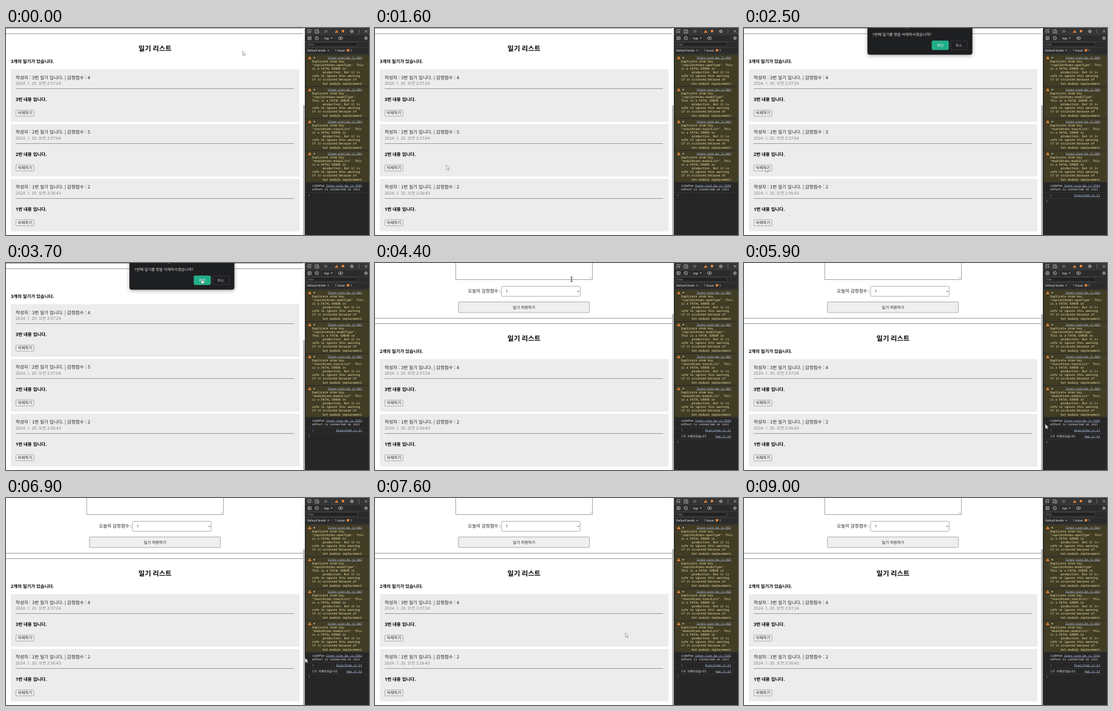
Animation of 600 by 343 pixels, one loop 9100 ms. Source, as an HTML page with a canvas:

```html
<!DOCTYPE html>
<html lang="ko">
<head>
<meta charset="utf-8">
<title>일기 리스트</title>
<style>
  html, body { margin: 0; width: 100%; height: 100%; overflow: hidden; background: #fff; }
  canvas { display: block; width: 600px; height: 343px; }
</style>
</head>
<body>
<canvas id="stage"></canvas>
<script>
const W = 600, H = 343, LOOP = 9100, STEP = 100;
const OPEN = 2300, REMOVE = 4200, LEAVE = 8500;
const SHIFT = 91;
const SANS = '"Noto Sans", "Noto Sans CJK KR", "Noto Sans CJK", sans-serif';
const CJK = '"Noto Sans CJK KR", "Noto Sans CJK", sans-serif';
const UI = 'Roboto, "Noto Sans CJK KR", sans-serif';
const MONO = '"Noto Sans Mono", "Noto Sans CJK KR", monospace';

const canvas = document.getElementById('stage');
const ctx = canvas.getContext('2d');
const dpr = window.devicePixelRatio || 1;
canvas.width = W * dpr;
canvas.height = H * dpr;

function rect(x, y, w, h, color) {
  ctx.fillStyle = color;
  ctx.fillRect(x, y, w, h);
}

function rule(x, y, w, color) {
  rect(x, Math.round(y), w, 1, color);
}

function box(x, y, w, h, r, fill, stroke, lw = 0.7) {
  ctx.beginPath();
  ctx.roundRect(x, y, w, h, r);
  if (fill) { ctx.fillStyle = fill; ctx.fill(); }
  if (stroke) { ctx.strokeStyle = stroke; ctx.lineWidth = lw; ctx.stroke(); }
}

function path(points, color, lw = 0.8) {
  ctx.beginPath();
  points.forEach(([x, y], i) => i ? ctx.lineTo(x, y) : ctx.moveTo(x, y));
  ctx.strokeStyle = color;
  ctx.lineWidth = lw;
  ctx.stroke();
}

function shape(points, color) {
  ctx.beginPath();
  points.forEach(([x, y]) => ctx.lineTo(x, y));
  ctx.fillStyle = color;
  ctx.fill();
}

function ring(x, y, r, color, lw = 0.8) {
  ctx.beginPath();
  ctx.arc(x, y, r, 0, Math.PI * 2);
  ctx.strokeStyle = color;
  ctx.lineWidth = lw;
  ctx.stroke();
}

// y is the visual middle of the line
function text(s, x, y, size, color, { family = SANS, weight = 400, align = 'left' } = {}) {
  ctx.font = `${weight} ${size}px ${family}`;
  ctx.textAlign = align;
  ctx.fillStyle = color;
  ctx.fillText(s, x, y + size * 0.36);
  return ctx.measureText(s).width;
}

const bold = { weight: 700 };
const center = { align: 'center' };

/* ---------- page ---------- */

const LINE = '#9a9a9a', BORDER = '#8c8c8c', INK = '#1c1c1c';

const entries = [
  { id: 3, score: 4, time: '2:37:24' },
  { id: 2, score: 5, time: '2:37:04' },
  { id: 1, score: 2, time: '2:36:43' }
];

function card(e, y, hover) {
  rect(8, y, 477, 87, '#ececec');
  text(`작성자 : ${e.id}번 일기 입니다. | 감정점수 : ${e.score}`, 16, y + 13.5, 7.5, INK, { family: CJK });
  text(`2024. 1. 20. 오전 ${e.time}`, 16, y + 23.4, 6.75, '#808080');
  rule(16, y + 31.6, 460, LINE);
  text(`${e.id}번 내용 입니다.`, 16, y + 50.4, 7.45, '#000', bold);
  box(16.4, y + 67.9, 29.8, 9.9, 1, hover ? '#e2e2e2' : '#efefef', BORDER);
  text('삭제하기', 31.2, y + 72.8, 6.5, INK, center);
}

function form() {
  path([[133.4, 0], [133.4, 27.5], [359.4, 27.5], [359.4, 0]], BORDER);
  path([[354.5, 26], [358, 22.5]], '#888', 0.5);
  path([[356.5, 26], [358, 24.5]], '#888', 0.5);
  text('오늘의 감정점수 :', 153.5, 46.5, 7.5, INK);
  box(209.2, 38.6, 130, 16.6, 1.5, '#fff', BORDER);
  text('1', 216, 46.8, 6.4, INK);
  path([[334.6, 46.1], [336.2, 47.8], [337.8, 46.1]], '#222', 0.8);
  box(137.9, 64.6, 216.5, 17.4, 1, '#efefef', BORDER);
  text('일기 저장하기', 246.3, 73.2, 6.4, INK, center);
}

function page(removed, hover) {
  const top = removed ? 0 : -SHIFT;
  const list = removed ? entries.filter(e => e.id !== 2) : entries;
  rect(0, 0, 494, H, '#fff');
  if (removed) form();
  rule(0, top + 91, 491, LINE);
  rule(0, top + 100, 491, LINE);
  text('일기 리스트', 246.3, top + 125, 11.2, '#000', { ...bold, ...center });
  text(`${list.length}개의 일기가 있습니다.`, 8, top + 145.9, 7.4, '#000', bold);
  list.forEach((e, i) => card(e, top + 159.3 + i * 90.8, hover && e.id === 2));
  rect(491, 0, 3, H, '#f4f4f4');
  const thumb = removed ? 85 : 128;
  rect(491, thumb, 3, H - thumb, '#b8b8b8');
}

function dialog() {
  ctx.save();
  ctx.shadowColor = 'rgba(0,0,0,.35)';
  ctx.shadowBlur = 6 * dpr;
  ctx.shadowOffsetY = 1.5 * dpr;
  box(204, -10, 173.5, 54.3, 4, '#1e1f21');
  ctx.restore();
  text('내용:', 261, -2.2, 6.3, '#ddd');
  text('1번째 일기를 정말 삭제하시겠습니까?', 212, 10.6, 6.25, '#e4e4e4');
  box(310.8, 21.3, 27.2, 14.6, 1.8, '#1fae88', '#38c49d', 0.8);
  text('확인', 324.4, 28.6, 6, '#fff', center);
  box(341.4, 21.6, 27.4, 14.2, 1.8, '#1e1f21', '#45474a', 0.7);
  text('취소', 355, 28.6, 6, '#c4c4c4', center);
}

/* ---------- console ---------- */

const ICON = '#c7c7c7', ORANGE = '#f08a3c', RULE = '#454545';
const LINK = '#b4c6ea', LOG = '#ececec';

function warnSign(x, y, s = 2.7) {
  shape([[x, y - s], [x + s * 1.1, y + s * 0.8], [x - s * 1.1, y + s * 0.8]], ORANGE);
  rect(x - 0.3, y - s * 0.35, 0.6, 1.4, '#3a2410');
}

function caret(x, y) {
  shape([[x, y - 1], [x + 2.8, y - 1], [x + 1.4, y + 1.2]], ICON);
}

function gear(x, y) {
  ring(x, y, 2.1, ICON, 0.9);
  ring(x, y, 0.6, ICON, 0.7);
  for (let a = 0; a < 6; a++) {
    const c = Math.cos(a * Math.PI / 3), s = Math.sin(a * Math.PI / 3);
    path([[x + 2.2 * c, y + 2.2 * s], [x + 3 * c, y + 3 * s]], ICON, 0.9);
  }
}

function issueMark(x, y) {
  box(x - 2, y - 2, 4, 3.5, 0.5, ORANGE);
  shape([[x - 1.2, y + 1.2], [x + 0.8, y + 1.2], [x - 1.2, y + 2.8]], ORANGE);
}

function toolbar() {
  rect(494, 0, 106, 43.5, '#2b2b2b');
  rect(494, 0, 106, 11, '#353535');
  [11, 22.2, 32.2, 43.4].forEach(y => rect(494, y, 106, 0.6, RULE));

  path([[504.4, 4], [504.4, 2.8], [499, 2.8], [499, 8], [500.6, 8]], ICON);
  shape([[501.2, 4.8], [505, 6.4], [503.4, 7], [502.8, 8.8]], ICON);
  path([[511, 7.8], [511, 3], [516.5, 3]], ICON);
  path([[510.3, 8.2], [513.5, 8.2]], ICON);
  box(514.2, 4.4, 2.8, 4.2, 0.5, null, ICON, 0.8);
  [526.2, 528.8].forEach(x => path([[x, 3.4], [x + 2.1, 5.5], [x, 7.6]], '#a9c0ea', 0.8));
  rect(538.5, 2, 0.5, 7, RULE);
  warnSign(546.5, 5.7);
  issueMark(557, 5.3);
  rect(563.5, 2, 0.5, 7, RULE);
  gear(571.6, 5.5);
  [3, 5.5, 8].forEach(y => box(582.8, y - 0.6, 1.2, 1.2, 0.6, ICON));
  path([[593, 3.3], [597.2, 7.6]], ICON);
  path([[597.2, 3.3], [593, 7.6]], ICON);

  box(499, 14.3, 5.4, 5, 0.4, null, ICON, 0.8);
  path([[500.8, 14.3], [500.8, 19.3]], ICON);
  shape([[502, 15.6], [503.6, 16.8], [502, 18]], ICON);
  ring(513.8, 16.8, 2.8, ICON);
  path([[512, 15], [515.6, 18.6]], ICON);
  rect(521, 13, 0.5, 8, RULE);
  text('top', 526, 16.8, 5.6, '#e6e6e6', { family: UI });
  caret(537, 16.8);
  rect(543.8, 13, 0.5, 8, RULE);
  ctx.beginPath();
  ctx.ellipse(553, 16.8, 3.6, 2.3, 0, 0, Math.PI * 2);
  ctx.strokeStyle = ICON;
  ctx.stroke();
  box(551.9, 15.7, 2.2, 2.2, 1.1, ICON);
  rect(588, 13, 0.5, 8, RULE);
  gear(595, 16.8);

  box(496.3, 23.6, 85.2, 7.1, 1, '#222', '#5c5c5c', 0.6);
  text('Filter', 498.5, 27.3, 4.8, '#8c8c8c', { family: UI });
  text('Default levels', 498, 37.4, 5.1, '#e6e6e6', { family: UI });
  caret(531.2, 37.4);
  rect(538, 34, 0.5, 7, RULE);
  text('1 Issue:', 543.5, 37.4, 5.1, '#e6e6e6', { family: UI });
  issueMark(565.3, 37.1);
  text('1', 569.3, 37.4, 5.1, '#e6e6e6', { family: UI });
}

function link(s, y) {
  const w = text(s, 588.5, y, 4.75, LINK, { family: MONO, weight: 500, align: 'right' });
  rect(588.5 - w, y + 2.2, w, 0.5, LINK);
}

function mono(s, x, y, color) {
  text(s, x, y, 4.9, color, { family: MONO, weight: 500 });
}

// the message wraps after the key unless the next word still fits
function warning(y, key) {
  const fits = key.length < 22;
  const lines = [
    'Duplicate atom key',
    `"${key}".${fits ? ' This' : ''}`,
    `${fits ? '' : 'This '}is a FATAL ERROR in`,
    '      production. But it is',
    'safe to ignore this warning',
    'if it occurred because of',
    '      hot module replacement.'
  ];
  box(495.5, y, 106, 52, 1.5, '#413c24');
  warnSign(502, y + 4.7);
  shape([[508.6, y + 3.2], [511.2, y + 4.7], [508.6, y + 6.2]], '#ddd');
  link('liner-core.be.js:863', y + 4.4);
  lines.forEach((s, i) => mono(s, 506, y + 10.6 + i * 6.1, '#f8eeb2'));
}

function log(y, s, src, color = LOG) {
  mono(s, 506, y, color);
  link(src, y);
  rect(494, y + 5, 106, 0.5, '#3c3c3c');
}

const keys = ['copilotAtoms-openType', 'copilotAtoms-modelType',
  'toastAtoms-toastList', 'modalAtoms-modalList'];

function devtools(opened, removed) {
  rect(494, 0, 106, H, '#262626');
  toolbar();
  keys.forEach((key, i) => warning(44.6 + i * 53, key));
  mono('sidePan', 506, 261, LOG);
  link('liner-core.be.js:3593', 261);
  mono('elPort is connected on init', 506, 267.2, LOG);
  rect(494, 272, 106, 0.5, '#3c3c3c');
  if (opened) log(277.2, '1', 'DiaryItem.js:21', '#9a80ff');
  if (removed) log(286.8, '1가 삭제되었습니다', 'App.js:52');
  const y = 277 + (opened ? 9.8 : 0) + (removed ? 9.6 : 0);
  path([[500, y - 1.4], [501.5, y], [500, y + 1.4]], '#7ba0e0', 0.7);
}

/* ---------- pointer ---------- */

// time, x, y of each resting point
const route = [
  [0, 391, 38], [500, 391, 38], [1600, 118, 227.5], [1900, 36, 231], [2500, 36, 231],
  [3400, 324, 27], [4600, 325, 27], [5000, 325, 27], [5700, 498, 267],
  [6800, 498, 267], [7600, 414, 223.4], [7900, 414, 223.4], [LEAVE, 470, -10]
];

function pointerAt(t) {
  const i = route.findIndex(p => p[0] > t);
  if (i < 1) return null;
  const [t0, x0, y0] = route[i - 1], [t1, x1, y1] = route[i];
  const k = (t - t0) / (t1 - t0), e = k * k * (3 - 2 * k);
  return [x0 + (x1 - x0) * e, y0 + (y1 - y0) * e];
}

function arrow(x, y) {
  const pts = [[0, 0], [0, 7.4], [1.7, 5.9], [2.8, 8.4], [4, 7.9], [2.9, 5.5], [5.1, 5.3]]
    .map(([a, b]) => [x + a, y + b]);
  shape(pts, '#fff');
  path([...pts, pts[0]], '#6a6a6a', 0.6);
}

function hand(x, y) {
  box(x - 1.6, y + 2.6, 5, 4.4, 1.4, '#fff', '#333', 0.5);
  box(x - 0.8, y - 1, 1.5, 5, 0.7, '#fff', '#333', 0.5);
  rect(x - 0.5, y + 2.6, 1, 2, '#fff');
}

function beam(x, y) {
  path([[x, y - 3.6], [x, y + 3.6]], '#111', 0.9);
  path([[x - 1.8, y - 3.8], [x + 1.8, y - 3.8]], '#111', 0.7);
  path([[x - 1.8, y + 3.8], [x + 1.8, y + 3.8]], '#111', 0.7);
}

function pointer(t, removed) {
  const p = pointerAt(t);
  if (!p) return;
  const [x, y] = p;
  const modal = t >= OPEN && !removed;
  if (modal && x > 311 && x < 338 && y < 36) hand(x, y);
  else if (removed && x > 133 && x < 359 && y < 28) beam(x, y);
  else arrow(x, y);
}

function draw(t) {
  const opened = t >= OPEN, removed = t >= REMOVE;
  ctx.setTransform(dpr, 0, 0, dpr, 0, 0);
  ctx.textRendering = 'geometricPrecision';
  page(removed, t >= 1900 && !opened);
  if (opened && !removed) dialog();
  devtools(opened, removed);
  pointer(t, removed);
}

const start = performance.now();
function frame(now) {
  const t = Math.max(0, now - start) % LOOP;
  draw(Math.floor(t / STEP) * STEP);
  requestAnimationFrame(frame);
}
draw(0);
requestAnimationFrame(frame);
</script>
</body>
</html>
```
